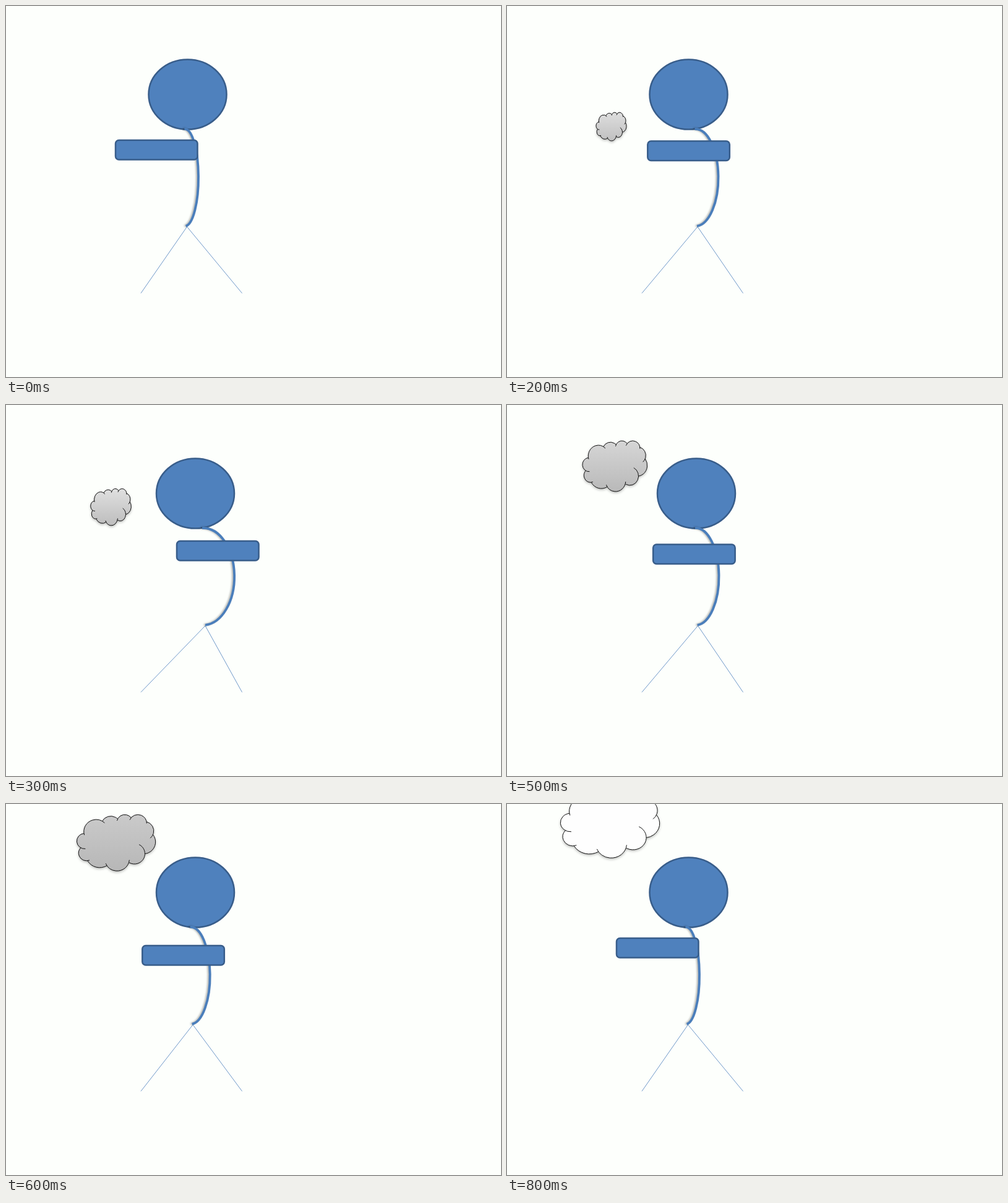
An HTML page with a canvas that plays this animation: 800 by 600 pixels, repeating every 0.9 s.

```html
<!DOCTYPE html>
<html lang="en">
<head>
<meta charset="utf-8">
<title>Stick figure with cloud</title>
<style>
html, body { margin: 0; width: 100%; height: 100%; overflow: hidden; background: #fdfffc; }
canvas { display: block; }
</style>
</head>
<body>
<canvas id="stage" width="800" height="600"></canvas>
<script>
const ctx = document.getElementById("stage").getContext("2d");
const STEP = 100, STEPS = 9;
const PAPER = "#fdfffc", BLUE = "#4f81bd", EDGE = "#385d8a", LINE = "#4a7ebb", INK = "#111";

// Key poses, blended linearly: step, hip x, head x, arm x, arm y
const bodyKeys = [
  [0, 292.5, 293.5, 177, 217],
  [2, 308, 293.5, 227.3, 218.5],
  [3, 322, 306, 276, 220],
  [4, 315, 306, 252, 221.8],
  [6, 302, 306, 220.3, 229],
  [7, 292.5, 299.7, 197, 229],
  [8, 292.5, 293.5, 177, 217]
];

// Step, centre x, centre y, width, height, top grey, bottom grey
const cloudKeys = [
  [2, 168.5, 195, 49, 46, 222, 192],
  [4, 170.5, 135, 82, 73, 226, 186],
  [6, 178, 62.5, 127, 91, 202, 183],
  [7, 185, 51, 159, 108, 234, 222],
  [8, 166.5, 33, 160, 108, 254, 254]
];

// Chained round lobes: radius, start and end angle, curl before and after (degrees)
const lobes = [
  [67.5, 172, 300, 9, 14], [53.3, 208, 315, 0, 0], [43.6, 206.5, 323, 14, 0],
  [48.6, 220, 350, 17, 11], [53.3, 285, 383, 0, 27], [67.7, 322.5, 442, 0, 0],
  [57.8, 0.5, 122, 64, 0], [67.5, 17, 146, 12, 12], [77.2, 59, 150, 0, 0],
  [43.6, 83, 223, 15, 0], [43.5, 120, 264, 35, 0]
];
const CLOUD_SIZE = 432, LOBE_STRETCH = 1.363;

const radians = degrees => degrees * Math.PI / 180;
const mix = (a, b, t) => a + (b - a) * t;

function blend(keys, step) {
  const next = Math.max(1, keys.findIndex(key => key[0] >= step));
  const from = keys[next - 1], to = keys[next];
  const t = (step - from[0]) / (to[0] - from[0]);
  return from.map((value, i) => mix(value, to[i], t)).slice(1);
}

function setShadow(dx, dy, blur, alpha) {
  ctx.shadowColor = `rgba(0,0,0,${alpha})`;
  ctx.shadowOffsetX = dx;
  ctx.shadowOffsetY = dy;
  ctx.shadowBlur = blur;
}

function paint(fill, stroke, width) {
  if (fill) {
    ctx.fillStyle = fill;
    ctx.fill();
  }
  ctx.strokeStyle = stroke;
  ctx.lineWidth = width;
  ctx.stroke();
}

// Traces the lobes end to end, or each one separately with its curls.
function traceCloud(x, y, w, h, withCurls) {
  ctx.save();
  ctx.translate(x - w / 2, y - h / 2);
  ctx.scale(w / CLOUD_SIZE, h / CLOUD_SIZE * LOBE_STRETCH);
  ctx.beginPath();
  let penX = 39, penY = 105.4;
  for (const [r, start, end, before, after] of lobes) {
    const cx = penX - r * Math.cos(radians(start));
    const cy = penY - r * Math.sin(radians(start));
    const from = radians(withCurls ? start - before : start);
    const to = radians(withCurls ? end + after : end);
    if (withCurls) ctx.moveTo(cx + r * Math.cos(from), cy + r * Math.sin(from));
    ctx.arc(cx, cy, r, from, to);
    penX = cx + r * Math.cos(radians(end));
    penY = cy + r * Math.sin(radians(end));
  }
  ctx.restore();
}

function drawCloud([x, y, w, h, top, bottom]) {
  const shade = ctx.createLinearGradient(0, y - h / 2, 0, y + h / 2);
  shade.addColorStop(0, `rgb(${top},${top},${top})`);
  shade.addColorStop(1, `rgb(${bottom},${bottom},${bottom})`);
  traceCloud(x, y, w, h, false);
  ctx.save();
  setShadow(0, 2, 4, 0.3);
  ctx.fillStyle = shade;
  ctx.fill();
  ctx.restore();
  traceCloud(x, y, w, h, true);
  paint(null, INK, 1);
}

function drawFigure([hip, head, armX, armY]) {
  ctx.beginPath();
  ctx.ellipse(head, 143, 63, 56.6, 0, 0, 2 * Math.PI);
  paint(BLUE, EDGE, 2.5);

  ctx.beginPath();
  ctx.moveTo(218, 464.5);
  ctx.lineTo(hip, 357);
  ctx.lineTo(381.5, 464.5);
  paint(null, LINE, 0.8);

  // The spine bows further as the hips move right.
  const bow = 22 + 0.97 * (hip - 292.5);
  ctx.save();
  setShadow(-2, 0, 3, 0.3);
  ctx.beginPath();
  ctx.ellipse(hip - 3.5, 277.5, bow, 78.5, 0, -1.6, 1.5);
  paint(null, LINE, 3.8);
  ctx.restore();

  ctx.beginPath();
  ctx.roundRect(armX, armY, 132.5, 31.6, 5.5);
  paint(BLUE, EDGE, 2.5);
}

function render(time) {
  const step = Math.floor(time / STEP) % STEPS;
  ctx.fillStyle = PAPER;
  ctx.fillRect(0, 0, 800, 600);
  drawFigure(blend(bodyKeys, step));
  if (step >= cloudKeys[0][0]) drawCloud(blend(cloudKeys, step));
}

const began = performance.now();
function tick() {
  render(performance.now() - began);
  requestAnimationFrame(tick);
}
tick();
</script>
</body>
</html>
```
